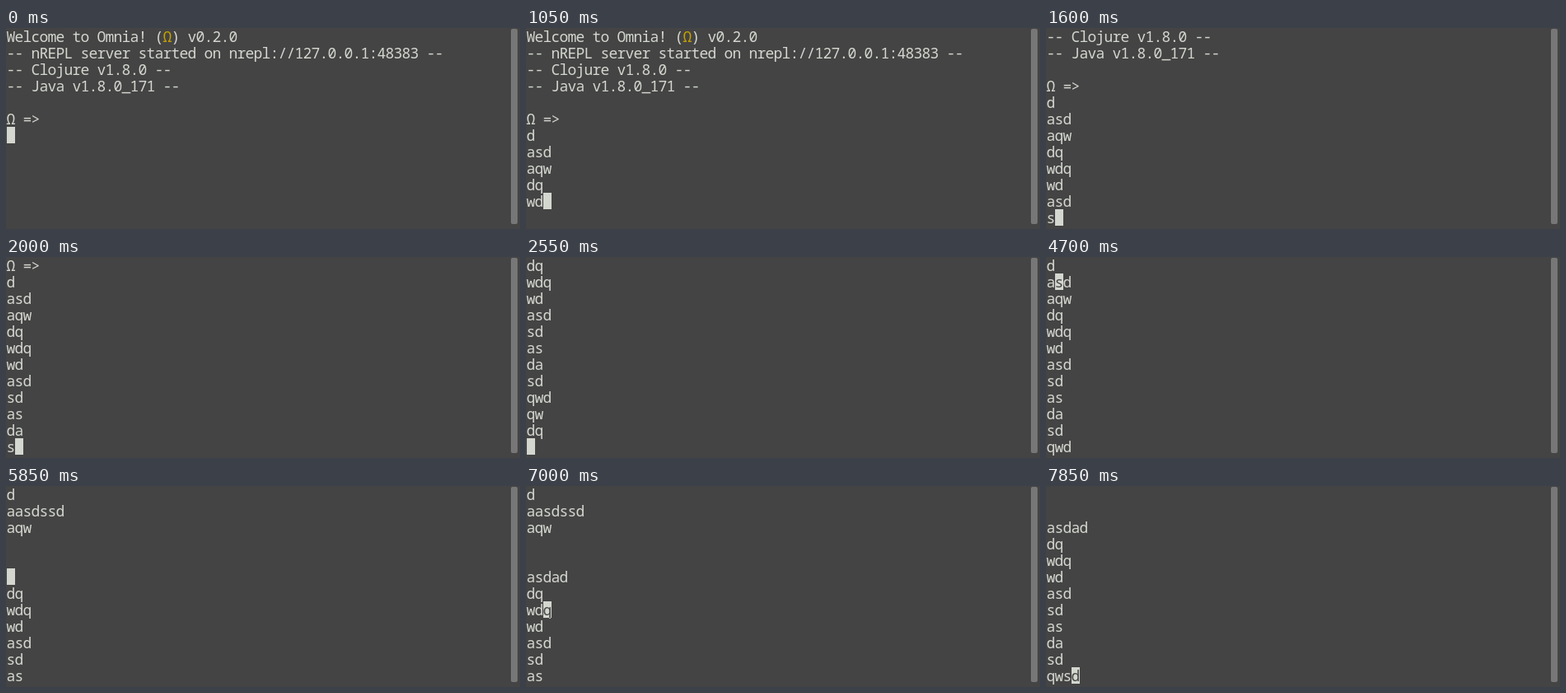
These frames come from a looping animation (624x244 px, 8 s). An HTML page:

```html
<!DOCTYPE html>
<html lang="en">
<head>
<meta charset="utf-8">
<title>Terminal session</title>
<style>
  html, body { margin: 0; width: 100%; height: 100%; overflow: hidden; background: #444; }
  #term {
    position: relative; width: 624px; height: 244px; overflow: hidden;
    background: #444; color: #d3d7cf;
    font: 18px/20px "Noto Sans Mono", "DejaVu Sans Mono", monospace;
    letter-spacing: calc(10px - .6em); white-space: pre;
  }
  #rows, #cursor { position: absolute; text-indent: -.4px; }
  #rows { left: 1px; top: 0; }
  #rows div { height: 20px; }
  #rows i { font-style: normal; color: #c4a000; }
  #cursor { width: 10px; height: 20px; overflow: hidden; background: #d3d7cf; color: #444; }
  #bar { position: absolute; left: 613px; top: 1px; width: 8px; height: 237px; border-radius: 2px; background: #777; }
</style>
</head>
<body>
<div id="term"><div id="rows"></div><div id="cursor"></div><div id="bar"></div></div>
<script>
const LOOP = 8000, HEIGHT = 12, CELL = 10, LINE = 20;

const banner = [
  'Welcome to Omnia! (Ω) v0.2.0',
  '-- nREPL server started on nrepl://127.0.0.1:48383 --',
  '-- Clojure v1.8.0 --',
  '-- Java v1.8.0_171 --',
  '',
  'Ω =>'
];

// [time in ms, keys]; ↑ and ↓ move, _ blinks the cursor off
const script = [
  [150, '_'], [300, 'd'], [350, '\n'], [400, 'a'], [450, 's'], [500, 'd'],
  [600, '\n'], [650, 'a'], [700, 'q'], [750, 'w'], [800, '\n'], [850, 'd'],
  [900, 'q'], [1000, '\nw'], [1050, 'd'], [1150, 'q\n'], [1200, 'w'],
  [1350, 'd\nas'], [1450, 'd\n'],
  [1600, 's'], [1650, 'd\n'], [1700, 'a'], [1800, 's\n'], [1850, 'd'],
  [1900, 'a\n'], [2000, 's'], [2050, 'd\n'], [2100, 'q'], [2200, 'w'],
  [2250, 'd\n'], [2300, 'qw'], [2400, '\nd'],
  [2500, 'q'], [2550, '\n'], [2600, 'w'], [2650, 'd'], [2700, 'q'], [2800, 'w'],
  [2950, '↑'], [3450, '↑↑'], [3500, '↑'], [3550, '↑↑'], [3600, '↑'], [3650, '↑↑'],
  [3850, '↑'], [4000, '↑'], [4150, '↑'], [4300, '↑'], [4450, '↑'],
  [4700, '↓'], [4800, 'a'], [4850, 's'], [4900, 'd'], [5050, 's'], [5200, '↓'],
  [5550, '\n'], [5650, '\n'], [5850, '\n'],
  [6050, 'a'], [6100, 's'], [6200, 'd'], [6350, 'a'], [6400, 'd'], [6550, '↓'],
  [7000, '↓'], [7050, '↓'], [7100, '↓↓'], [7200, '↓'], [7250, '↓'], [7300, '↓'],
  [7450, '↓'], [7850, 's']
];

const lines = [...banner, ''];
let row = banner.length, col = 0, top0 = 0, visible = true;

function press(key) {
  visible = key !== '_';
  if (!visible) return;
  if (key === '↑' || key === '↓') {
    row += key === '↑' ? -1 : 1;
    col = Math.min(col, lines[row].length);
  } else {
    const before = lines[row].slice(0, col), after = lines[row].slice(col);
    if (key === '\n') {
      lines.splice(row, 1, before, after);
      row++;
      col = 0;
    } else {
      lines[row] = before + key + after;
      col++;
    }
  }
  top0 = Math.max(row - HEIGHT + 1, Math.min(top0, row));
}

function snapshot(time) {
  return {
    time, col, visible,
    row: row - top0,
    text: lines.slice(top0, top0 + HEIGHT),
    char: lines[row][col] || ''
  };
}

const screens = [snapshot(0)];
for (const [time, keys] of script) {
  for (const key of keys) press(key);
  screens.push(snapshot(time));
}

const rows = document.getElementById('rows');
const cursor = document.getElementById('cursor');
const markup = line => '<div>' + line.replace('>', '&gt;').replace('(Ω)', '(<i>Ω</i>)') + '</div>';
let shown = null;

function draw(screen) {
  if (screen === shown) return;
  shown = screen;
  rows.innerHTML = screen.text.map(markup).join('');
  cursor.textContent = screen.char;
  cursor.style.left = 1 + screen.col * CELL + 'px';
  cursor.style.top = screen.row * LINE + 'px';
  cursor.style.visibility = screen.visible ? 'visible' : 'hidden';
}

const start = performance.now();
function tick(now) {
  const t = Math.max(0, now - start) % LOOP;
  draw(screens.findLast(s => s.time <= t));
  requestAnimationFrame(tick);
}
draw(screens[0]);
requestAnimationFrame(tick);
</script>
</body>
</html>
```
